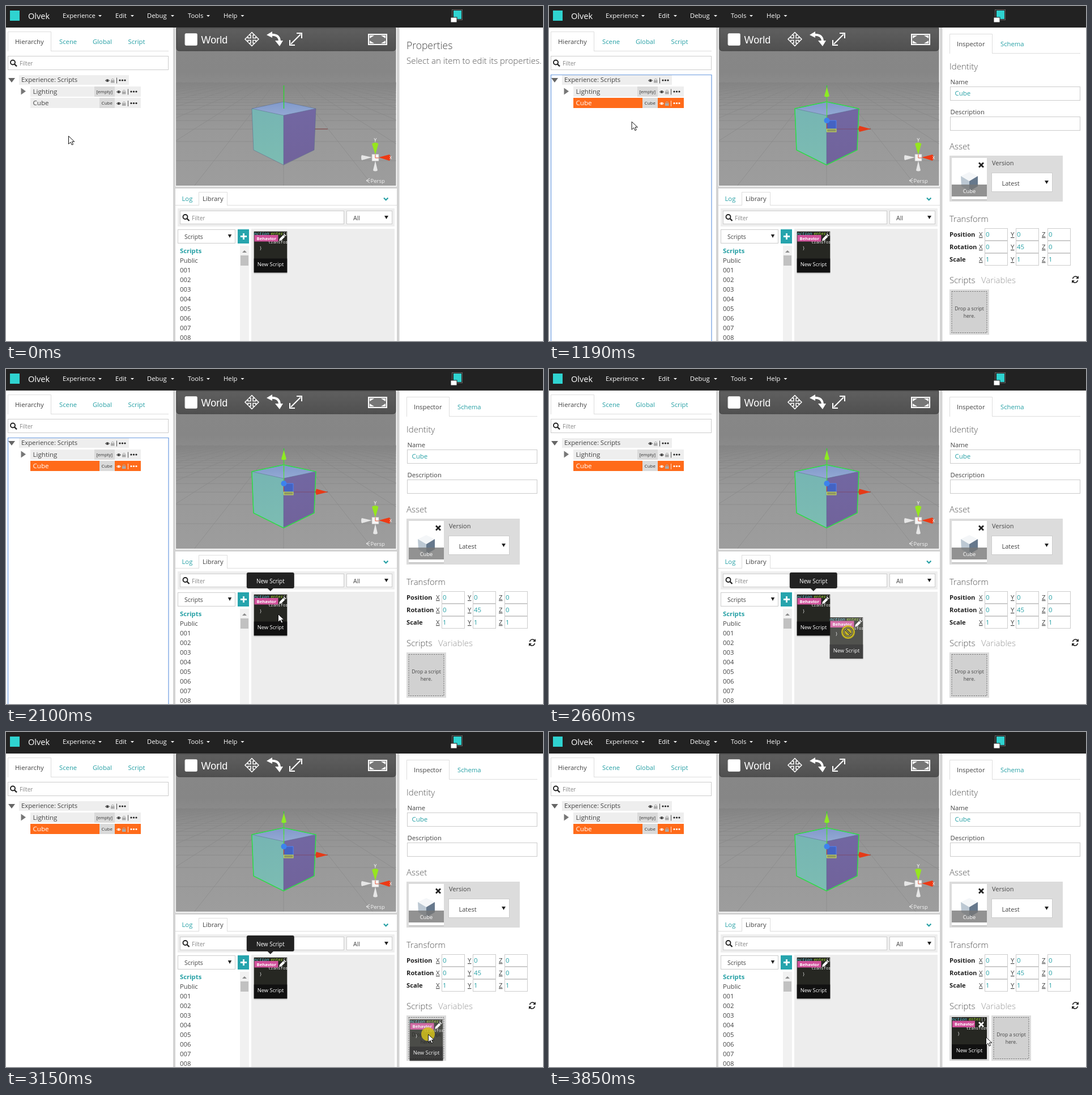
These frames come from a looping animation (948 px wide and 591 px high, 4.75 s). An HTML page:

```html
<!DOCTYPE html>
<html lang="en">
<head>
<meta charset="utf-8">
<title>Scene editor</title>
<style>
html, body { margin: 0; width: 100%; height: 100%; overflow: hidden; background: #fff; }
svg { display: block; }
text { font-family: "Open Sans", "Noto Sans", sans-serif; white-space: pre; }
.mono { font-family: "Noto Sans Mono", "DejaVu Sans Mono", monospace; }
.arial { font-family: "Liberation Sans", Arial, sans-serif; }
</style>
</head>
<body>
<svg id="stage" width="948" height="591" viewBox="0 0 948 591"></svg>
<script>
const LOOP = 4750, STEP = 70;
const TEAL = '#26a0a5', INK = '#444', LINE = '#ddd', FIELD = '#ccc';

// Drawing helpers
const rect = (x, y, w, h, fill, more = '') =>
  `<rect x="${x}" y="${y}" width="${w}" height="${h}" fill="${fill}" ${more}/>`;
const box = (x, y, w, h, stroke = FIELD, fill = '#fff') =>
  rect(x + .5, y + .5, w - 1, h - 1, fill, `stroke="${stroke}"`);
const text = (x, y, s, size = 11.3, fill = INK, more = '') =>
  `<text x="${x}" y="${y}" font-size="${size}" fill="${fill}" ${more}>${s}</text>`;
const path = (d, fill, more = '') => `<path d="${d}" fill="${fill}" ${more}/>`;
const stroke = (d, color, width = 1, more = '') =>
  path(d, 'none', `stroke="${color}" stroke-width="${width}" ${more}`);
const group = (id, s) => `<g id="${id}">${s}</g>`;
const MID = 'text-anchor="middle"', BOLD = 'font-weight="700"', LIGHT = 'font-weight="300"';

const title = (x, y, s, fill = '#555', size = 15) => text(x, y, s, size, fill, LIGHT);
const down = (x, y, w, h, fill) => path(`M${x - w / 2} ${y}h${w}l${-w / 2} ${h}z`, fill);
const lens = (x, y) =>
  `<circle cx="${x - 1}" cy="${y - 1}" r="4" fill="none" stroke="#222" stroke-width="1.9"/>` +
  stroke(`M${x + 2} ${y + 2}l4 4`, '#222', 2.4);
const cross = (x, y, r, color) =>
  stroke(`M${x - r} ${y - r}l${2 * r} ${2 * r}m0 ${-2 * r}l${-2 * r} ${2 * r}`, color, 2.8);

// Four joined arrows, 24 px across
const FOUR_WAY = 'M0-12l5 5h-3v5h5v-3l5 5-5 5v-3h-5v5h3l-5 5-5-5h3v-5h-5v3l-5-5 5-5v3h5v-5h-3z';

function topBar() {
  const menus = [['Experience', 100, 163], ['Edit', 193, 220], ['Debug', 249, 291],
    ['Tools', 321, 354], ['Help', 384, 414.5]];
  return rect(0, 0, 948, 38, '#222') +
    rect(7, 8, 17, 18, '#2fd3d0') +
    text(39, 22.5, 'Olvek', 14.6, '#fff') +
    menus.map(([s, x, c]) => text(x, 21, s, 11.3, '#fff') + down(c + 3, 16, 6, 3, '#fff')).join('') +
    box(787, 6, 19, 19, '#666', '#222') + rect(790, 8, 14, 15, '#2fd3d0') +
    rect(785, 20, 11, 9, '#fff', 'stroke="#222"');
}

function tab(x, y, w, h, s, tx) {
  return stroke(`M${x + .5} ${y + h}v${.5 - h}h${w - 1}v${h - .5}`, LINE) + text(tx, y + 22, s);
}

function rowTools(x, y, eye) {
  return stroke(`M${x - 3.5} ${y}q3.5-3.6 7 0q-3.5 3.6-7 0z`, eye, 1) +
    `<circle cx="${x}" cy="${y}" r="1.5" fill="${eye}"/>` +
    rect(x + 6, y - .5, 6.5, 4.5, '#aaa') + stroke(`M${x + 7.5} ${y}v-2q1.8-2.6 3.6 0v2`, '#aaa', 1.1) +
    stroke(`M${x + 16.5} ${y - 5}v10`, eye, .8) +
    [22, 26.5, 31].map(d => `<circle cx="${x + d}" cy="${y - .5}" r="1.6" fill="${eye}"/>`).join('');
}

function cubeRow(on) {
  const ink = on ? '#fff' : '#222';
  return rect(43, 162, 195, 18, on ? '#ff6b1a' : '#eee') + rect(165, 162, 27, 18, '#dadada') +
    text(47.5, 174.5, 'Cube', 11.6, on ? '#fff' : INK) +
    text(178.3, 173.5, 'Cube', 8, '#333', MID) + rowTools(199, 172, ink);
}

function hierarchy() {
  return tab(3, 45, 77, 35, 'Hierarchy', 16) + stroke('M80 79.5H287', LINE) +
    [['Scene', 94], ['Global', 153], ['Script', 215.5]].map(([s, x]) => text(x, 67, s, 11.3, TEAL)).join('') +
    box(3, 88, 284, 25) + lens(13, 100.5) + text(24, 105, 'Filter', 10, '#888') +
    rect(23, 122, 194, 17, '#eee') + down(10, 127, 12, 8, '#666') +
    text(27, 134, 'Experience: Scripts') + rowTools(179, 131.5, '#222') +
    rect(43, 142, 195, 18, '#eee') + rect(156, 142, 36, 18, '#dadada') +
    path('M26.5 144.5l8.5 6-8.5 6z', '#777') + text(47.5, 154.5, 'Lighting', 11.6) +
    text(173.8, 153.5, '[empty]', 7.9, '#333', MID) + rowTools(199, 151.5, '#222') +
    group('rowOff', cubeRow(false)) + group('rowOn', cubeRow(true)) +
    group('focus', stroke('M3.5 592V121.5H287V592', '#6a9be0', 1.2));
}

// Ground plane seen in perspective
function floor() {
  const cx = 490, horizon = 117, f = 442, eye = 1.27, depth = 5.6;
  let d = '';
  for (let z = -3; z < 26; z++) {
    const y = horizon + f * eye / (depth + z);
    if (y < 318) d += `M300 ${y.toFixed(1)}H689`;
  }
  for (let k = -24; k <= 24; k++) {
    const x = z => (cx + k * f / z).toFixed(1);
    d += `M${x(2.7)} ${(horizon + f * eye / 2.7).toFixed(1)}L${x(32)} ${(horizon + f * eye / 32).toFixed(1)}`;
  }
  return stroke(d, 'url(#fade)', .7);
}

function toolbar() {
  return path('M301 39H688V74q0 5-5 5H306q-5 0-5-5z', 'url(#bar)', 'stroke="#3d3d3d"') +
    rect(316, 48.5, 21.5, 21, '#fff', 'rx="2" stroke="#ddd"') +
    text(344.5, 66, 'World', 18, '#fff', 'class="arial"') +
    path(FOUR_WAY, '#5a5a5a', 'transform="translate(434 58.5)" stroke="#fff" stroke-width="1.5"') +
    stroke('M466 51Q483 49 483 63', '#fff', 4) +
    path('M460 51l10-6v11zM475 61h14l-6 10z', '#fff') +
    stroke('M503 67L520 50', '#fff', 2.2) +
    stroke('M501 60v9h9M513 48h9v9', '#fff', 2) +
    rect(640, 50, 32, 18, '#777', 'stroke="#fff" stroke-width="2"') +
    path('M642 52h8l-8 5zM670 52v5l-8-5zM642 66v-5l8 5zM670 66h-8l8-5z', '#fff');
}

function viewport() {
  const outline = 'M434 181L490 169L547 181L544 254L490 280.5L437 254z';
  return rect(300, 38, 389, 280, 'url(#air)') + floor() + toolbar() +
    stroke('M545 217H568', '#7c3a3a', 1.2) +
    path('M434 181L490 169L547 181L490 193z', 'url(#top)') +
    path('M434 181L490 193V280L437 254z', 'url(#left)') +
    path('M490 193L547 181L544 254L490 280z', 'url(#right)') +
    stroke('M434 181L490 193L547 181M490 193V280', '#536b91', .8, 'opacity=".6"') +
    stroke(outline, '#4d6488', .8, 'opacity=".6"') +
    stroke('M490.5 140V181', '#26dc2a', 1.3) +
    group('handles',
      stroke(outline, '#2ee044', 1.5) + stroke('M490.5 158V217', '#52df3a', 1.2) +
      path('M490.5 143L486 159Q490 162 495 159z', '#8dec22') +
      stroke('M490.5 217H548', '#7a4a70', 1) +
      path('M568 217L548 211.5Q545 217 548 222z', '#e63a17') +
      rect(491, 202, 16, 15, '#3562cf', 'opacity=".75"') + stroke('M491 202H507V217', '#4f83f5', 1) +
      stroke('M490.5 202V217', '#c23a45', 1.2) +
      '<circle cx="490.5" cy="202" r="5" fill="#3c83ee"/>' +
      rect(490.5, 217, 16.5, 5, '#8f9560', 'stroke="#c8e05a"')) +
    path('M646 243Q652 239 657.5 243L652 262z', '#96e61e') +
    path('M677 262Q681 267 677 273L658 267z', '#ee3a14') +
    path('M628 263Q626 267 628 272L646 267z', '#e6e6e6') +
    path('M648 290Q652 293 656 290L652 273z', '#e6e6e6') +
    rect(646, 261.5, 12, 12, '#f4f4f4', 'stroke="#bbb" stroke-width=".7"') +
    stroke('M652 262V268H658', '#e05030', 1) +
    text(652, 240, 'Y', 8.5, '#fff', MID) + text(679, 270, 'x', 8.5, '#fff', MID) +
    stroke('M642 304L636 308L642 312M637 308H642', '#eee', 1) +
    text(643.5, 312, 'Persp', 9.5, '#f2f2f2');
}

function card(x, y, w, h, extra, icon) {
  const code = (cx, cy, s, fill, more = '') => text(cx, cy, s, 7.2, fill, 'class="mono" ' + more);
  return rect(x, y + 2, w, h, '#000', 'opacity=".12"') +
    `<svg x="${x}" y="${y}" width="${w}" height="${h}">` + rect(0, 0, w, h, '#262722') +
    code(-4, 6, 'unction', '#62cfe6', 'font-style="italic"') + code(30, 6, 'enter', '#a2dc30') +
    code(51.5, 6, '() {', '#eee') + code(25.5, 21.5, 'transform.', '#eee') + code(10, 31, '}', '#eee') +
    rect(0, 48, w, h - 48, '#111') + rect(1, 6.5, 42 - extra, 11.5, '#d0509a') +
    text(5, 15, 'Behavior', 7.7, '#fff', BOLD) +
    text(w / 2, 61.5 + extra / 3, 'New Script', 9.4, '#fff', MID) +
    (icon === 'x' ? cross(52, 13, 4, '#fff')
      : path('M44.5 17l1-4 6.5-6.5 3 3-6.5 6.5zM52.7 5.7l1.3-1 2.8 2.8-1 1.2z', '#fff')) +
    '</svg>';
}

function library() {
  const names = ['Public', ...Array.from({ length: 8 }, (_, i) => '00' + (i + 1))];
  return rect(299, 322, 391, 269, '#fff') + stroke('M299 351.5H690', LINE) +
    rect(341, 350, 49, 3, '#fff') + tab(340, 328, 51, 24, '', 0) +
    text(310.5, 344, 'Log', 11.3, TEAL) + text(347, 344, 'Library') +
    stroke('M667 338.5l3.7 3.7 3.7-3.7', TEAL, 2.2) +
    rect(303, 357, 383, 32, '#eee') + box(307, 361, 290, 24) + lens(317.5, 373) +
    text(328, 377.5, 'Filter', 10, '#888') + box(601, 361, 81, 24) +
    text(613, 377.5, 'All', 10.6) + down(671.5, 370, 7, 6, '#222') +
    rect(433, 393, 253, 198, '#ededed') +
    box(303, 394, 102, 25) + text(315, 410.5, 'Scripts', 10.5) + down(395, 403, 6.5, 6, '#222') +
    rect(409, 394, 20, 25, '#26a4ad') + stroke('M414 406.5h11m-5.5-5.5v11', '#fff', 2.8) +
    text(307, 436, 'Scripts', 11.3, TEAL, BOLD) +
    names.map((s, i) => text(307, 453 + 17 * i, s)).join('') +
    rect(413, 423, 16, 168, '#f1f1f1') + rect(414, 440, 14, 18, '#c1c1c1') +
    path('M417 435h8l-4-4z', '#8a8a8a') +
    card(437.5, 397.5, 59, 73, 0);
}

function dropZone(x) {
  return rect(x, 500, 70, 80, '#dcdcdc') +
    rect(x + 4, 503.5, 62, 73, '#d1d1d1', 'stroke="#777" stroke-dasharray="2.5 1.5"') +
    text(x + 35, 537, 'Drop a script', 8.6, INK, MID) + text(x + 35, 549.5, 'here.', 8.6, INK, MID);
}

function inspector() {
  const rows = [['Position', 0, 0, 0], ['Rotation', 0, 45, 0], ['Scale', 1, 1, 1]];
  const cells = [['X', 759, 769], ['Y', 815, 824], ['Z', 870, 880]];
  return tab(707, 49, 76, 35, 'Inspector', 720) + stroke('M783 83.5H938', LINE) +
    text(797, 71, 'Schema', 11.3, TEAL) +
    title(707, 112, 'Identity') + text(708.5, 137.5, 'Name') + box(708, 142, 230, 25) +
    text(716.5, 158, 'Cube', 11.5, TEAL) + text(708.5, 191, 'Description') + box(708, 195, 230, 25) +
    title(707, 253, 'Asset') + rect(707, 264, 200, 81, '#dcdcdc') +
    rect(711, 268, 62, 74, '#fff') + path('M727 300L742 293L757 300L742 309z', '#f4f6f8') +
    path('M727 300L742 309V327L728 318z', '#bcc8d3') + path('M742 309L757 300V318L742 327z', '#66788c') +
    rect(711, 315, 62, 21, '#777', 'opacity=".8"') + text(742, 329.5, 'Cube', 9.4, '#fff', MID) +
    rect(711, 341, 62, 2, '#c4c4c4') +
    cross(763, 280.5, 4, '#222') + text(782, 281, 'Version', 11) +
    box(781, 294, 108, 34) + text(799.5, 316.5, 'Latest', 11) + down(878.5, 308, 7, 6, '#222') +
    title(707, 381, 'Transform') +
    rows.map(([name, ...v], r) => {
      const y = 392 + 22 * r;
      return text(707, y + 15, name, 11.2, '#222', BOLD) + cells.map(([axis, ax, bx], i) =>
        text(ax, y + 15, axis, 11.5, INK, 'text-decoration="underline"') +
        box(bx, y, 41, 22) + text(bx + 2, y + 15, v[i], 11.5, TEAL)).join('');
    }).join('') +
    title(707, 489, 'Scripts') + title(763, 489, 'Variables', '#999') +
    stroke('M924.5 481q1.5-4 5-4 3 0 4.5 3M933.5 484q-1.5 4-5 4-3 0-4.5-3', '#222', 1.7) +
    path('M935 476v5h-5zM923 489v-5h5z', '#222') +
    dropZone(707) +
    group('added', rect(707, 500, 70, 80, '#dcdcdc') + card(711, 503, 62, 74, 2, 'x') + dropZone(781));
}

function tip(id, cx, y, w, s) {
  return group(id, rect(cx - w / 2, y, w, 28, '#222', 'rx="3"') + down(cx, y + 27.5, 11, 5.5, '#222') +
    text(cx, y + 18.5, s, 10, '#fff', MID));
}

function cursors() {
  return group('pointer',
      group('ring', '<circle r="12" fill="#d4c21c" opacity=".85"/>') +
      group('arrow', path('M.5 .5V14.5L4 11.2L6.3 16L8.6 15L6.4 10.3H10.8z', '#fff', 'stroke="#111"')) +
      group('move', path(FOUR_WAY, '#fff', 'transform="scale(.77)" stroke="#111" stroke-width="1.3"')) +
      group('deny', '<circle r="7.5" fill="none" stroke="#333" stroke-width="3"/>' + stroke('M-5 -5L5 5', '#333', 3) +
        '<circle r="7.5" fill="none" stroke="#d9cf80" stroke-width="1"/>' + stroke('M-5 -5L5 5', '#d9cf80', 1)));
}

const ramp = (id, stops, more = 'x2="0" y2="1"') => `<linearGradient id="${id}" ${more}>` +
  stops.map(([o, c]) => `<stop offset="${o}" stop-color="${c}"/>`).join('') + '</linearGradient>';

const stage = document.getElementById('stage');
stage.innerHTML = '<defs>' +
  ramp('air', [[0, '#888'], [.28, '#868686'], [.42, '#8f8f8f'], [.65, '#999'], [1, '#9d9d9d']]) +
  ramp('bar', [[0, '#5f5f5f'], [1, '#505050']]) +
  ramp('fade', [[0, '#828282'], [.3, '#858585'], [1, '#8a8a8a']],
    'gradientUnits="userSpaceOnUse" x1="0" y1="125" x2="0" y2="318"') +
  ramp('top', [[0, '#8199ca'], [1, '#93a9d4']]) + ramp('left', [[0, '#76b5b3'], [1, '#7cbcb2']]) +
  ramp('right', [[0, '#7267a2'], [1, '#71639b']]) +
  '<clipPath id="view"><rect x="300" y="38" width="388.5" height="279"/></clipPath></defs>' +
  rect(0, 0, 948, 591, '#fff') + rect(295, 37, 4, 554, '#d3d3d3') + rect(690, 37, 4.5, 554, '#d3d3d3') +
  rect(299, 318.5, 391, 3.5, '#d3d3d3') +
  `<g clip-path="url(#view)">${viewport()}</g>` + topBar() + hierarchy() + library() +
  group('empty', title(707, 76, 'Properties', '#444', 17.5) +
    title(707, 102, 'Select an item to edit its properties.', '#555', 15)) +
  group('inspector', inspector()) +
  tip('tipCube', 104, 124, 58, 'Cube') + tip('tipScript', 466.8, 359, 84, 'New Script') +
  group('ghost', card(0, 0, 59, 73, 0)) + cursors();

const el = {};
stage.querySelectorAll('g[id]').forEach(g => { el[g.id] = g; });
const show = (id, on) => { el[id].style.display = on ? '' : 'none'; };
const place = (id, x, y) => el[id].setAttribute('transform', `translate(${x.toFixed(1)} ${y.toFixed(1)})`);
el.ghost.setAttribute('opacity', .78);

// Pointer route: time, x, y
const ROUTE = [[0, 110, 229], [560, 107, 172], [1120, 107, 172], [1470, 300, 330], [1820, 438, 418],
  [2100, 480, 432], [2450, 480, 432], [2520, 488, 444], [2730, 548, 474], [2940, 650, 512],
  [3010, 700, 521], [3150, 745, 533], [3290, 763, 538], [3780, 763, 538], [3850, 771, 538], [LOOP, 771, 538]];

function pointerAt(t) {
  const i = Math.max(1, ROUTE.findIndex(k => k[0] >= t));
  const [t0, x0, y0] = ROUTE[i - 1], [t1, x1, y1] = ROUTE[i];
  const p = (t - t0) / (t1 - t0);
  return [x0 + (x1 - x0) * p, y0 + (y1 - y0) * p];
}

function draw(ms) {
  const t = Math.floor(ms / STEP) * STEP;
  const [x, y] = pointerAt(t);
  const picked = t >= 700, pressed = t >= 2380 && t < 3570, dragging = t >= 2520 && t < 3570;
  const overRow = y < 181, denied = dragging && x < 707;
  show('rowOff', !picked);
  show('rowOn', picked);
  show('handles', picked);
  show('empty', !picked);
  show('inspector', picked);
  show('focus', t >= 560 && t < 2380);
  show('tipCube', overRow);
  show('tipScript', t >= 1890 && t < 3850);
  show('added', t >= 3640);
  show('ghost', dragging);
  show('ring', pressed);
  show('move', overRow);
  show('deny', denied);
  show('arrow', !overRow && !denied);
  place('pointer', x, y);
  place('ghost', x - 32.5, y - 26);
}

const start = performance.now();
function tick() {
  draw((performance.now() - start) % LOOP);
  requestAnimationFrame(tick);
}
draw(0);
requestAnimationFrame(tick);
</script>
</body>
</html>
```
